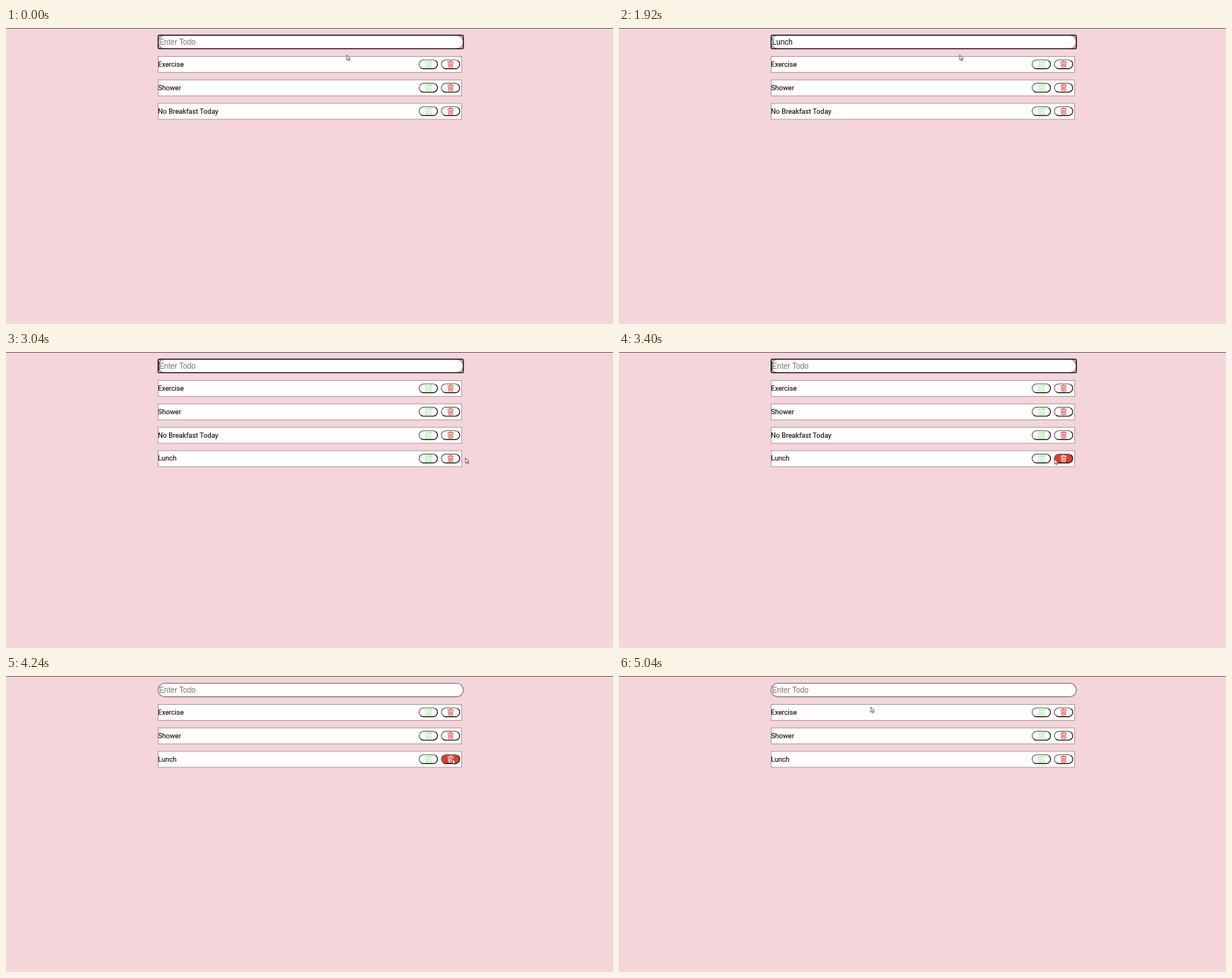
An HTML page for the animation above (5080 ms loop, 800 px wide and 390 px high).

```html
<!DOCTYPE html>
<html lang="en">
<head>
<meta charset="utf-8">
<title>Todo list</title>
<style>
  html, body { margin: 0; width: 100%; height: 100%; overflow: hidden; background: #f4d5d9; }
  svg { display: block; }
  .label { font: 400 9.15px Roboto, sans-serif; fill: #111; stroke: #111; stroke-width: .12px; }
  .entry { font: 10px "Liberation Sans", Arial, sans-serif; }
  .row { fill: #fffdfe; stroke: #a99a9c; stroke-width: .9; }
  .pill { fill: #fffdfe; stroke: url(#outset); stroke-width: 1.15; }
  .icon { fill: none; stroke-width: .9; stroke-linejoin: round; stroke-linecap: round; }
  .pen { stroke: #8fe993; }
  .bin { stroke: #ec5448; }
  .hover .pill { fill: #e53a2a; }
  .hover .bin { stroke: #ffe9e6; }
</style>
</head>
<body>
<svg width="800" height="390" viewBox="0 0 800 390">
  <defs>
    <linearGradient id="outset" x1="0" y1="0" x2="1" y2="1">
      <stop offset=".48" stop-color="#666"/>
      <stop offset=".52" stop-color="#111"/>
    </linearGradient>
  </defs>
  <rect width="800" height="1" fill="#75696b"/>
  <rect x="200.4" y="9.5" width="402.4" height="17.9" rx="8.95" fill="#fffdfe" stroke="#777" stroke-width="1.1"/>
  <rect id="focus" x="200.5" y="9.5" width="402.2" height="17.9" rx="1.8" fill="none" stroke="#1c181a" stroke-width="1.4"/>
  <text id="entry" class="entry" x="201.7" y="21.9"></text>
  <rect id="caret" y="13" width=".8" height="11" fill="#111"/>
  <g id="rows"></g>
  <path id="cursor" d="M0 0V6.8L1.5 5.5L2.6 7.8L3.6 7.3L2.6 5.1H4.6Z" fill="#fff" stroke="#333" stroke-width=".7" stroke-linejoin="round"/>
</svg>
<script>
const LOOP = 5080, STEP = 40, PITCH = 30.85;
const SUBMIT = 2040, REMOVE = 4120;
const KEYS = [280, 480, 680, 860, 1040];
const $ = id => document.getElementById(id);

// time, x, y of the pointer tip
const POINTER = [
  [0, 449, 35.5], [2680, 449, 35.5], [2920, 588, 132], [3080, 609, 141],
  [3240, 590, 141], [3400, 574, 141], [3600, 574, 141], [3840, 585, 110],
  [4080, 585, 109.5], [4240, 588.5, 109], [4440, 584, 110.5],
  [4600, 584, 110.5], [5000, 332, 41], [LOOP, 332, 41]
];

const row = i => `<g transform="translate(0 ${i * PITCH})">
  <rect class="row" x="200.4" y="37.5" width="400.2" height="21"/>
  <text class="label" x="200.3" y="50.9"></text>
  <rect class="pill" x="544.5" y="42" width="24.2" height="11.6" rx="5.8"/>
  <path class="icon pen" d="M557.5 44.6H553.2V51.7H560.2V48.6M555.7 49.3L556.2 47.2L560.2 43.3L561.7 44.8L557.7 48.8ZM559.2 44.4L560.6 45.8"/>
  <g class="remove">
    <rect class="pill" x="573.8" y="42" width="24.2" height="11.6" rx="5.8"/>
    <path class="icon bin" d="M582.1 44.8H589.7M584.2 44.6L584.8 43.5H587L587.6 44.6M583 45L583.4 51.9H588.4L588.8 45M584.7 46.6V50.3M585.9 46.6V50.3M587.1 46.6V50.3"/>
  </g>
</g>`;
$("rows").innerHTML = [0, 1, 2, 3].map(row).join("");
const rows = [...$("rows").children];

function pointerAt(t) {
  const i = POINTER.findIndex(p => p[0] > t);
  const [t0, x0, y0] = POINTER[i - 1], [t1, x1, y1] = POINTER[i];
  const u = (t - t0) / (t1 - t0), k = u * u * (3 - 2 * u);
  return [x0 + (x1 - x0) * k, y0 + (y1 - y0) * k];
}

function draw(t) {
  const items = ["Exercise", "Shower"];
  if (t < REMOVE) items.push("No Breakfast Today");
  if (t >= SUBMIT) items.push("Lunch");

  const [x, y] = pointerAt(t);
  $("cursor").setAttribute("transform", `translate(${x} ${y})`);
  rows.forEach((g, i) => {
    const inside = x > 573 && x < 598.6 && Math.abs(y - 47.8 - i * PITCH) < 6.5;
    g.style.display = i < items.length ? "" : "none";
    g.querySelector("text").textContent = items[i] || "";
    g.querySelector(".remove").classList.toggle("hover", inside);
  });

  const typed = t < SUBMIT ? "Lunch".slice(0, KEYS.filter(k => k <= t).length) : "";
  const entry = $("entry"), focused = t < REMOVE;
  entry.textContent = typed || "Enter Todo";
  entry.setAttribute("fill", typed ? "#111" : "#757575");
  $("focus").style.display = focused ? "" : "none";

  // The caret restarts its blink at every edit
  const edit = Math.max(-500, ...[...KEYS, SUBMIT].filter(k => k <= t));
  const lit = Math.floor((t - edit) / 500) % 2 === 0;
  $("caret").style.display = focused && lit ? "" : "none";
  $("caret").setAttribute("x", 201.5 + (typed ? entry.getComputedTextLength() : 0));
}

function tick() {
  draw(Math.floor(performance.now() % LOOP / STEP) * STEP);
  requestAnimationFrame(tick);
}
tick();
</script>
</body>
</html>
```
